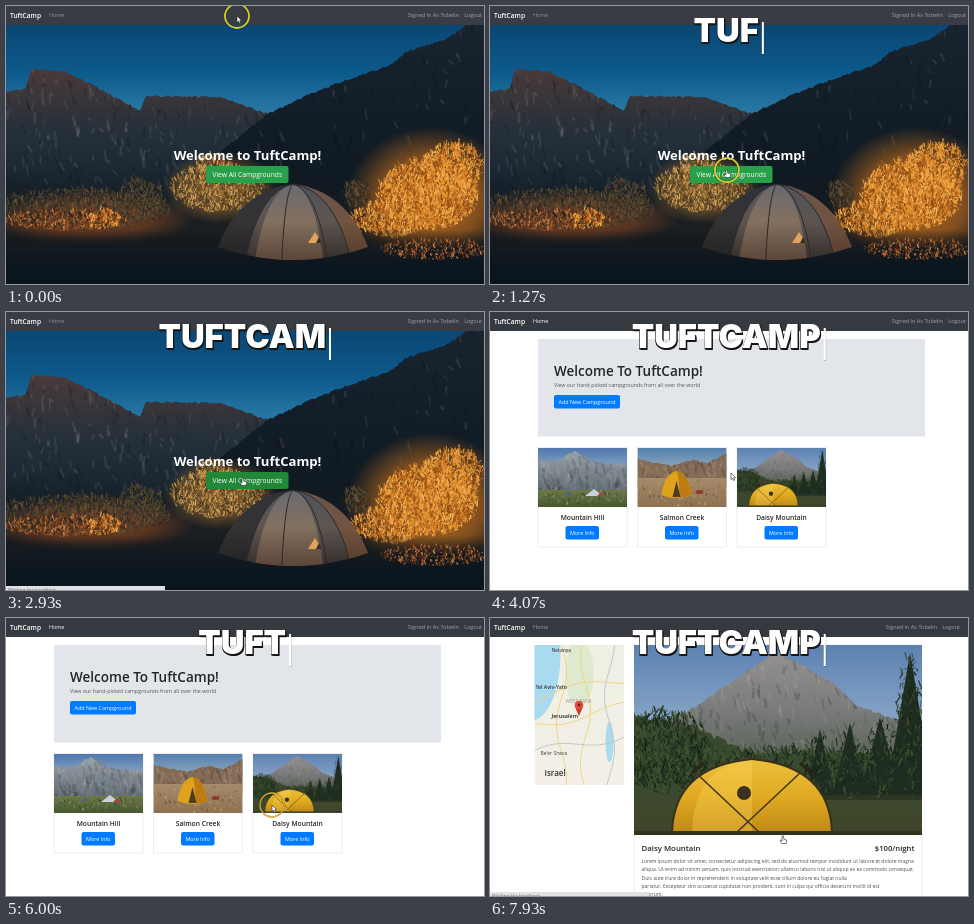
Write an HTML page with a canvas that moves like this. It is 478 px wide and 278 px high and loops after 8000 ms.

```html
<!DOCTYPE html>
<html lang="en">
<head>
<meta charset="utf-8">
<title>TuftCamp</title>
<style>
  html, body { margin: 0; width: 100%; height: 100%; overflow: hidden; background: #fff; }
  canvas { display: block; width: 478px; height: 278px; }
</style>
</head>
<body>
<canvas id="stage"></canvas>
<script>
const W = 478, H = 278, LOOP = 8000;
const SANS = '"Open Sans", "Noto Sans", sans-serif';
const dpr = Math.max(1, window.devicePixelRatio || 1);
let g;

function prepare(canvas) {
  canvas.width = W * dpr;
  canvas.height = H * dpr;
  const c = canvas.getContext('2d');
  c.scale(dpr, dpr);
  return c;
}

// Paint something once and keep it for every later frame.
function layer(paint) {
  const canvas = document.createElement('canvas');
  g = prepare(canvas);
  paint();
  return canvas;
}

function seeded(seed) {
  return () => (seed = (seed * 16807) % 2147483647) / 2147483647;
}

const ramp = (t, from, to) => Math.min(1, Math.max(0, (t - from) / (to - from)));
const smooth = p => p * p * (3 - 2 * p);

// Each key is [position, ...values].
function between(keys, at, ease = p => p) {
  let i = 1;
  while (i < keys.length - 1 && at > keys[i][0]) i++;
  const a = keys[i - 1], b = keys[i];
  const p = ease(ramp(at, a[0], b[0]));
  return a.slice(1).map((v, k) => v + (b[k + 1] - v) * p);
}

function box(x, y, w, h, color) {
  g.fillStyle = color;
  g.fillRect(x, y, w, h);
}

function outline(x, y, w, h) {
  g.strokeStyle = '#e1e1e1';
  g.lineWidth = 0.6;
  g.strokeRect(x, y, w, h);
}

function ellipse(x, y, rx, ry, color) {
  g.fillStyle = color;
  g.beginPath();
  g.ellipse(x, y, rx, ry, 0, 0, 7);
  g.fill();
}

function line(color, width, x0, y0, x1, y1) {
  g.strokeStyle = color;
  g.lineWidth = width;
  g.beginPath();
  g.moveTo(x0, y0);
  g.lineTo(x1, y1);
  g.stroke();
}

function triangle(color, x, top, base, spread) {
  g.fillStyle = color;
  g.beginPath();
  g.moveTo(x, top);
  g.lineTo(x + spread, base);
  g.lineTo(x - spread, base);
  g.fill();
}

function fade(y0, y1, ...colors) {
  const f = g.createLinearGradient(0, y0, 0, y1);
  colors.forEach((c, i) => f.addColorStop(i / (colors.length - 1), c));
  return f;
}

function glow(x, y, rx, ry, rgb, alpha) {
  g.save();
  g.translate(x, y);
  g.scale(rx, ry);
  const f = g.createRadialGradient(0, 0, 0, 0, 0, 1);
  f.addColorStop(0, `rgba(${rgb},${alpha})`);
  f.addColorStop(0.6, `rgba(${rgb},${alpha * 0.6})`);
  f.addColorStop(1, `rgba(${rgb},0)`);
  box(-1, -1, 2, 2, f);
  g.restore();
}

function text(str, x, y, size, color, weight = 400, align = 'left') {
  g.font = `${weight} ${size}px ${SANS}`;
  g.textAlign = align;
  g.fillStyle = color;
  g.fillText(str, x, y);
}

function button(label, x, y, w, h, size, color) {
  g.fillStyle = color;
  g.beginPath();
  g.roundRect(x, y, w, h, 2);
  g.fill();
  text(label, x + w / 2, y + h / 2 + size * 0.36, size, '#fff', 400, 'center');
}

// Rough skyline through a few points, filled to its base and softly grained.
function ridge(color, base, rough, keys, grain = 0) {
  const rnd = seeded(97), left = keys[0][0], right = keys[keys.length - 1][0];
  const top = Math.min(...keys.map(k => k[1]));
  g.save();
  g.beginPath();
  g.moveTo(left, base);
  for (let x = left; x < right + 2; x += 2) g.lineTo(x, between(keys, x)[0] + (rnd() - 0.5) * rough);
  g.lineTo(right, base);
  g.fillStyle = color;
  g.fill();
  g.clip();
  for (let i = 0; i < grain; i++) {
    const x = left + rnd() * (right - left), y = top + rnd() * (base - top);
    const tone = rnd() < 0.5 ? 'rgba(0,5,12,.14)' : 'rgba(235,205,190,.1)';
    line(tone, 1 + rnd() * 2, x, y, x + (rnd() - 0.3) * 7, y + 3 + rnd() * 9);
  }
  g.restore();
}

// A clump of short blades inside an ellipse.
function brush(x, y, rx, ry, colors, reach = 6, density = 0.8) {
  const rnd = seeded(Math.round(x * 31 + y));
  for (let i = rx * ry * density; i > 0; i--) {
    const a = rnd() * 6.283, d = Math.sqrt(rnd());
    const px = x + Math.cos(a) * d * rx, py = y + Math.sin(a) * d * ry;
    const color = colors[Math.floor(rnd() * colors.length)];
    line(color, 0.6 + rnd() * 0.8, px, py, px + (rnd() - 0.5) * reach, py - rnd() * reach);
  }
}

// Seams run from the peak to the hem; u goes from -1 at the left to 1 at the right.
function tent(cx, base, rx, h, sag, bend) {
  const hem = u => [cx + u * rx, base + sag * (1 - u * u)];
  const knee = u => [cx + u * rx * bend, base - h * 0.9];
  return {
    panel(color, from, to) {
      g.fillStyle = color;
      g.beginPath();
      g.moveTo(cx, base - h);
      g.quadraticCurveTo(...knee(from), ...hem(from));
      for (let i = 1; i <= 8; i++) g.lineTo(...hem(from + (to - from) * i / 8));
      g.quadraticCurveTo(...knee(to), cx, base - h);
      g.fill();
    },
    seam(color, width, u) {
      g.strokeStyle = color;
      g.lineWidth = width;
      g.beginPath();
      g.moveTo(cx, base - h);
      g.quadraticCurveTo(...knee(u), ...hem(u));
      g.stroke();
    }
  };
}

function nav(homeColor, shift = 0, color = '#343a40') {
  box(0, 0, W, 19, color);
  text('TuftCamp', 4, 11.6, 6.6, '#fff', 600);
  text('Home', 43, 11.4, 5.4, homeColor);
  text('Signed In As Tobelin', 453 - shift, 11.4, 5.5, '#a2a5a8', 400, 'right');
  text('Logout', 476 - shift, 11.4, 5.5, '#a2a5a8', 400, 'right');
}

function heroScene() {
  box(0, 0, W, H, fade(18, 115, '#0a4673', '#0d5a8c', '#2f7fa9'));
  ridge(fade(62, 190, '#4a3a3a', '#25303a', '#15222d'), 220, 2,
    [[0, 86], [20, 82], [25, 63], [60, 66], [82, 77], [112, 93], [134, 104], [140, 90], [215, 91],
      [262, 108], [330, 150]], 420);
  ridge(fade(20, 200, '#18242f', '#121d27', '#0e1820'), 220, 2,
    [[215, 145], [262, 108], [300, 90], [340, 74], [385, 59], [400, 46], [440, 33], [462, 18], [478, 16]], 180);
  box(0, 165, W, 113, fade(165, 278, 'rgba(20,27,32,0)', '#1c1e20', '#0b161f'));

  const ember = ['#8a4722', '#b3622c', '#5c321d', '#cf8442', '#33251d'];
  const straw = ['#a87a3a', '#c6934a', '#71532c', '#d8aa5e', '#453822'];
  const amber = ['#e58f2e', '#f3b659', '#c8731f', '#f0a23e', '#8f4d17'];
  const scrub = ['#3d372b', '#55452c', '#24292a', '#6b5230'];
  glow(85, 212, 105, 28, '150,75,35', 0.8);
  glow(215, 182, 58, 36, '165,115,50', 0.8);
  glow(425, 193, 85, 72, '215,120,30', 0.9);
  brush(75, 204, 90, 20, scrub);
  brush(60, 215, 62, 10, ember, 5);
  brush(97, 214, 18, 10, amber, 5);
  brush(135, 190, 22, 16, scrub);
  brush(212, 183, 47, 24, straw);
  brush(207, 163, 18, 13, straw);
  brush(350, 189, 14, 13, scrub);
  brush(422, 190, 50, 35, amber, 7, 1);
  brush(447, 162, 30, 24, amber, 7, 1);
  brush(384, 214, 38, 18, amber, 6, 1);
  box(0, 224, W, 54, fade(224, 262, 'rgba(22,22,24,0)', '#131a20', '#0b151d'));
  brush(430, 244, 55, 10, ember, 4);

  const dome = tent(287, 241, 75, 63, 13, 0.7);
  dome.panel(fade(178, 252, '#50535a', '#5e5550', '#37302d'), -1, 1);
  dome.panel('rgba(20,24,30,.55)', -1, -0.62);
  dome.panel(fade(178, 252, '#686970', '#83705f', '#5d483b'), -0.5, 0.4);
  dome.panel('rgba(150,85,42,.35)', 0.75, 1);
  for (const u of [-0.62, -0.15, 0.45, 0.75]) dome.seam('#292a2e', 1, u);
  triangle('#e2a35c', 309, 226, 237, 7);
  triangle('#3a2d22', 313, 231, 237, 3);
}

// Yellow dome under a grey peak, in a 288 by 190 space.
function domePhoto(x, y, w) {
  picture(x, y, w / 288, 288, 190, () => {
    const greens = ['#1f2e20', '#304128', '#43552f', '#17231a'];
    box(0, 0, 288, 190, fade(0, 110, '#5c82b2', '#9ab3cf'));
    ridge(fade(5, 120, '#959190', '#7b7c7d', '#566052'), 140, 3,
      [[0, 91], [58, 64], [94, 40], [142, 6], [202, 40], [222, 60], [288, 84]], 420);
    ridge('#3a4a2e', 190, 6, [[0, 70], [60, 82], [110, 106], [288, 108]]);
    brush(32, 108, 46, 42, greens, 9, 0.5);
    brush(150, 126, 150, 22, greens, 9, 0.3);
    for (let i = 0; i < 4; i++) {
      const tx = 276 - i * 30, top = i ? 66 + i * 6 : 8;
      triangle('#1e2d20', tx, top, 155, 25 - i * 3);
      brush(tx, (top + 160) / 2, 15, (150 - top) / 2, greens, 8, 0.2);
    }
    box(0, 150, 288, 40, fade(145, 190, 'rgba(70,72,42,.2)', '#3f442a'));
    const dome = tent(118, 188, 80, 74, 0, 0.98);
    dome.panel(fade(114, 190, '#ecc03c', '#e0aa22', '#bd8716'), -1, 1);
    dome.panel('rgba(255,216,95,.3)', -0.75, 0);
    for (const side of [-1, 1]) {
      dome.seam('#37301c', 2, side);
      line('#42361a', 1.6, 114 + side * 52, 128, 114 - side * 12, 188);
      line('#28241a', 3, 118 + side * 48, 118, 118 + side * 60, 128);
    }
    ellipse(110, 148, 7, 7, '#39301d');
    box(0, 186, 288, 4, '#2d341f');
  });
}

function picture(x, y, scale, w, h, paint) {
  g.save();
  g.translate(x, y);
  g.scale(scale, scale);
  g.beginPath();
  g.rect(0, 0, w, h);
  g.clip();
  paint();
  g.restore();
}

function valleyPhoto() {
  box(0, 0, 89, 59, fade(0, 30, '#4f78ad', '#a3b9cf'));
  ridge(fade(3, 45, '#98a1aa', '#5d6970'), 47, 3, [[0, 13], [22, 12], [37, 3], [52, 13], [89, 18]], 160);
  box(0, 42, 89, 17, fade(42, 59, '#6e7948', '#455731'));
  brush(44, 51, 48, 7, ['#3b4a2a', '#87905a', '#58693a'], 3, 0.25);
  triangle('#c8d2d9', 56, 41, 48, 9);
  triangle('#a34538', 63, 44, 48, 4);
  triangle('#48677f', 31, 43, 47, 4);
}

function desertPhoto() {
  box(0, 0, 89, 59, fade(0, 20, '#537fae', '#8ca6bc'));
  ridge('#846c56', 40, 2, [[0, 11], [34, 18], [55, 12], [70, 15], [89, 6]], 120);
  box(0, 30, 89, 29, fade(30, 59, '#a58c6a', '#8d7150'));
  brush(44, 46, 48, 13, ['#705a3d', '#b99a72', '#967b56'], 3, 0.2);
  const dome = tent(39, 47, 15, 24, 3, 0.8);
  dome.panel('#dfa21c', -1, 1);
  dome.panel('#bd7c12', 0.2, 1);
  triangle('#4d3d22', 39, 33, 49, 4);
  ellipse(62, 44, 4, 2, '#8d3830');
}

function home() {
  heroScene();
  nav('#8f9295', 0, '#393c43');
  text('Welcome to TuftCamp!', 241.5, 154, 13.1, '#fff', 700, 'center');
}

function list() {
  box(0, 0, W, H, '#fff');
  nav('#fff');
  box(48, 27, 387, 97.5, '#e2e6eb');
  text('Welcome To TuftCamp!', 64, 63.5, 13.5, '#212529', 600);
  text('View our hand-picked campgrounds from all over the world', 64, 75.2, 5.3, '#55595e');
  button('Add New Campground', 64, 83, 66, 13.5, 5.4, '#007bff');
  ['Mountain Hill', 'Salmon Creek', 'Daisy Mountain'].forEach((title, i) => {
    const x = 48 + i * 99.5;
    outline(x, 135.5, 89, 99.5);
    text(title, x + 44.5, 208.3, 6.7, '#212529', 600, 'center');
    button('More Info', x + 27.5, 214, 33.5, 13.5, 5.4, '#007bff');
  });
  picture(48, 136, 1, 89, 59, valleyPhoto);
  picture(147.5, 136, 1, 89, 59, desertPhoto);
  domePhoto(247, 136, 89);
}

function map() {
  box(0, 0, 90, 140, fade(0, 140, '#eef0e4', '#f3efe6'));
  ellipse(-4, 10, 30, 66, '#aadaf0');
  ellipse(45, 28, 14, 34, '#dfe9cf');
  ellipse(75, 97, 4, 20, '#aadaf0');
  for (let i = 0; i < 6; i++) {
    g.strokeStyle = i < 4 ? '#f1d27c' : '#bcc3c6';
    g.lineWidth = 0.9;
    g.beginPath();
    for (let s = 0; s <= 140; s += 5) {
      const sway = Math.sin(s / 17 + i * 2) * 5;
      if (i % 2) g.lineTo(s, 38 + i * 14 - s * 0.2 + sway);
      else g.lineTo(27 + i * 12 + sway, s);
    }
    g.stroke();
  }
  text('Netanya', 17, 7, 4.8, '#444', 600);
  text('Tel Aviv-Yafo', 1, 44, 5.2, '#333', 600);
  text('WEST BANK', 31, 58, 4.8, '#999');
  text('Jerusalem', 17, 73, 5.5, '#222', 600);
  text("Be'er Sheva", 6, 110, 5, '#444');
  text('Israel', 10, 130.5, 8, '#333', 600);
  triangle('#c9392d', 44.5, 71, 62, 4);
  ellipse(44.5, 60, 4.3, 4.3, '#e6473a');
  ellipse(44.5, 60, 1.5, 1.5, '#751f19');
}

function detail() {
  box(0, 0, W, H, '#fff');
  nav('#9a9da0', 6);
  picture(44.5, 27, 1, 89.5, 140, map);
  outline(144.3, 27, 287.6, 260);
  domePhoto(144, 27, 288);
  text('Daisy Mountain', 151.5, 233, 7.8, '#212529', 600);
  text('$100/night', 424.5, 233, 7.7, '#212529', 600, 'right');
  [
    'Lorem ipsum dolor sit amet, consectetur adipiscing elit, sed do eiusmod tempor incididunt ut labore et dolore magna',
    'aliqua. Ut enim ad minim veniam, quis nostrud exercitation ullamco laboris nisi ut aliquip ex ea commodo consequat.',
    'Duis aute irure dolor in reprehenderit in voluptate velit esse cillum dolore eu fugiat nulla',
    'pariatur. Excepteur sint occaecat cupidatat non proident, sunt in culpa qui officia deserunt mollit id est',
    'laborum.'
  ].forEach((row, i) => text(row, 151.5, 245 + i * 8.3, 5, '#4b4f53'));
}

const pointerStops = [[150, 231, 10], [1350, 237, 166], [3400, 237, 166], [3900, 241, 161],
  [4400, 241, 161], [5500, 266, 187], [6000, 266, 187], [6450, 293, 218]];

function pointer(t) {
  const [x, y] = between(pointerStops, t, smooth);
  const pale = ramp(t, 1300, 2000);
  g.save();
  g.translate(x, y);
  g.globalAlpha = 0.9 * (1 - ramp(t, 1700, 2500) + ramp(t, 4330, 4600) - ramp(t, 6400, 7000));
  for (const [color, width] of [['rgba(40,35,10,.5)', 2.8 - pale], [`hsl(${55 - 11 * pale},80%,56%)`, 1.8 - 0.5 * pale]]) {
    g.strokeStyle = color;
    g.lineWidth = width;
    g.beginPath();
    g.arc(0, 0, 12, 0, 7);
    g.stroke();
  }
  g.globalAlpha = 1;
  const hand = (t > 1250 && t < 3130) || t > 6400;
  const shape = new Path2D(hand
    ? 'M-1 0H.5L.8 3 3.6 4 3.2 7.5H-1.2L-3 4.5-2 3.9-1 5Z'
    : 'M0 0V6.5L1.5 5.2 2.6 7.5 3.7 7 2.7 4.8 4.6 4.6Z');
  g.fillStyle = '#fff';
  g.fill(shape);
  g.strokeStyle = '#222';
  g.lineWidth = 0.6;
  g.stroke(shape);
  g.restore();
}

// Typed out ever slower, then half deleted and typed again.
function letters(t) {
  if (t < 5670) return Math.floor(8 * (1 - (1 - ramp(t, 400, 3480)) ** 1.7));
  if (t < 6500) return 8 - Math.ceil(4 * ramp(t, 5670, 5950));
  return 4 + Math.floor(4 * ramp(t, 6500, 7300));
}

function headline(t) {
  if (t < 300) return;
  const word = 'TUFTCAMP'.slice(0, letters(t));
  g.font = '900 32.8px Inter, "Open Sans", sans-serif';
  g.textAlign = 'center';
  g.lineJoin = 'round';
  g.strokeStyle = g.fillStyle = '#151515';
  g.lineWidth = 1.6;
  g.strokeText(word, 236.6, 36.7);
  g.fillText(word, 237.5, 37.8);
  g.fillStyle = '#fff';
  g.fillText(word, 236.2, 36.2);
  const x = 236.2 + g.measureText(word).width / 2 + 3;
  box(x + 0.5, 17, 2, 32, 'rgba(0,0,0,.2)');
  box(x, 16, 2, 32, '#fff');
}

function status(t) {
  const hover = (t > 1400 && t < 2700) || (t > 6600 && t < 7400);
  const loading = (t >= 2700 && t < 3900) || t >= 7400;
  if (!hover && !loading) return;
  box(0, 274, hover ? 100 : 159, 4, '#dfe1e4');
  text(hover ? 'localhost/campgrounds' : 'Waiting for localhost...', 2, 279.5, 5, '#666');
}

const homePage = layer(home);
const listPage = layer(list);
const detailPage = layer(detail);
const screen = prepare(document.getElementById('stage'));

function frame(t) {
  g = screen;
  const page = t < 3130 ? homePage : t < 7500 ? listPage : detailPage;
  g.drawImage(page, 0, 0, W, H);
  if (page === homePage) {
    button('View All Campgrounds', 200, 160, 82.5, 17, 6.7, t > 1300 ? '#218838' : '#28a04a');
  }
  status(t);
  headline(t);
  pointer(t);
}

const start = performance.now();
function tick() {
  frame((performance.now() - start) % LOOP);
  requestAnimationFrame(tick);
}
tick();
</script>
</body>
</html>
```
